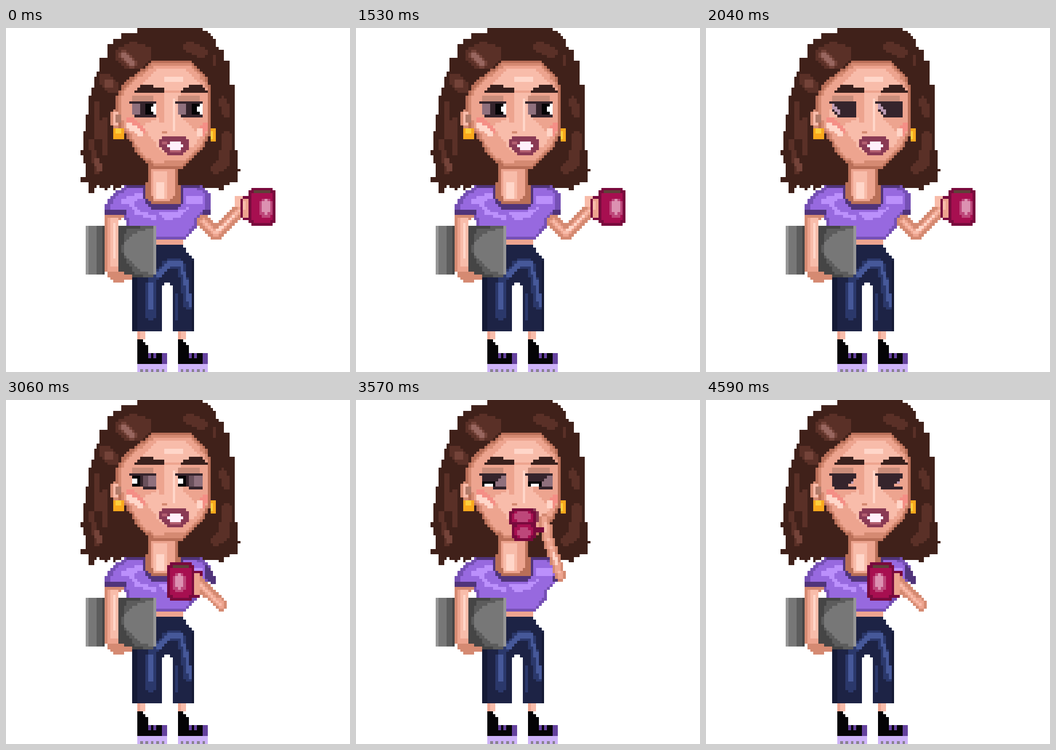
An HTML page with a canvas for the animation above (5100 ms loop, 600 by 600 pixels).

```html
<!DOCTYPE html>
<html>
<head>
<meta charset="utf-8">
<style>
html, body { margin: 0; width: 100%; height: 100%; overflow: hidden; background: #fff; }
canvas { display: block; width: 600px; height: 600px; }
</style>
</head>
<body>
<canvas id="stage" width="600" height="600"></canvas>
<script>
const ctx = document.getElementById('stage').getContext('2d');
const CELL = 600 / 127, STEP = 510;

const colors = {
  hair: '#40211a', hair2: '#5a3027', hair3: '#744339', hair4: '#98665f',
  edge: '#b96f58', shade: '#d58a72', skin: '#eda48f', light: '#f8bcaa', shine: '#ffd6c9', ear: '#b27b69',
  blush: '#f58f86', lid: '#c98d7b', brow: '#39201d', gold: '#f9a81c', sun: '#ffd03c',
  lip: '#8a3a54', lip2: '#b35f70', teeth: '#fff0fa',
  lash: '#35242c', mauve: '#8f707d', mauve2: '#69505b', lilac: '#bd9bb3', black: '#050406', white: '#fff',
  plum: '#50347a', violet: '#7650b5', purple: '#9769df', glow: '#bb90fb',
  slate: '#454545', slate2: '#5c5c5c', gray: '#777', silver: '#969696',
  navy: '#1d2345', ink: '#151a35', blue: '#2b386b', sky: '#465899',
  wine: '#790a3d', berry: '#a70f50', rose: '#bd477a', pink: '#dc91b1', coffee: '#5e4138',
  sole: '#cdb2f8', tread: '#89838f', lace: '#65429f'
};

const X = x => Math.round((x + .5) * CELL), Y = y => Math.round(y * CELL);
let shift = 0;

function box(color, x, y, w, h) {
  x += shift;
  ctx.fillStyle = colors[color];
  ctx.fillRect(X(x), Y(y), X(x + w) - X(x), Y(y + h) - Y(y));
}

// Box with its four corner cells missing.
function pill(color, x, y, w, h) {
  box(color, x + 1, y, w - 2, h);
  box(color, x, y + 1, w, h - 2);
}

// Fills a polygon cell by cell, so slanted edges become steps.
function poly(color, ...c) {
  const n = c.length, ys = c.filter((_, i) => i % 2);
  for (let y = Math.floor(Math.min(...ys)); y < Math.max(...ys); y++) {
    const cuts = [], m = y + .5;
    for (let i = 0; i < n; i += 2) {
      const [x0, y0, x1, y1] = [0, 1, 2, 3].map(k => c[(i + k) % n]);
      if (y0 > m !== y1 > m) cuts.push(Math.ceil(x0 + (m - y0) / (y1 - y0) * (x1 - x0) - .5));
    }
    cuts.sort((a, b) => a - b);
    for (let i = 0; i < cuts.length; i += 2) box(color, cuts[i], y, cuts[i + 1] - cuts[i], 1);
  }
}

// Repeats a polygon in new tones, each time smaller around a centre.
function nest(tones, cx, cy, step, ...c) {
  tones.split(' ').forEach((tone, k) => {
    poly(tone, ...c.map((v, i) => v + ((i % 2 ? cy : cx) - v) * step * k));
  });
}

function blob(color, cx, cy, rx, ry) {
  for (let y = Math.floor(cy - ry); y < cy + ry; y++) {
    const half = rx * Math.sqrt(Math.max(0, 1 - ((y + .5 - cy) / ry) ** 2));
    const left = Math.round(cx - half);
    box(color, left, y, Math.round(cx + half) - left, 1);
  }
}

// Thick rounded line from point to point; later tones are thinner.
function limb(tones, width, ...c) {
  tones.split(' ').forEach((tone, k) => {
    const r = width / 2 - k * .9;
    for (let i = 0; i + 3 < c.length; i += 2) {
      const [x, y, x1, y1] = c.slice(i, i + 4), dx = x1 - x, dy = y1 - y;
      for (let v = Math.floor(Math.min(y, y1) - r); v < Math.max(y, y1) + r; v++)
        for (let u = Math.floor(Math.min(x, x1) - r); u < Math.max(x, x1) + r; u++) {
          const px = u + .5 - x, py = v + .5 - y;
          const t = Math.min(1, Math.max(0, (px * dx + py * dy) / (dx * dx + dy * dy)));
          if (Math.hypot(px - t * dx, py - t * dy) <= r) box(tone, u, v, 1, 1);
        }
    }
  });
}

function fringe(x, depths) {
  [...depths].forEach((d, i) => box('hair', x + i, 50, 1, 7 + +d));
}

function drawHair() {
  poly('hair', 48, 0, 71, 0, 75, 2, 77, 4, 77, 7, 80, 8, 80, 12, 82, 12, 82, 21, 84, 21, 84, 45, 85, 45,
    85, 57, 72, 58, 48, 58, 29, 57, 29, 50, 28, 50, 28, 38, 29, 38, 30, 26, 32, 21, 33, 16, 34, 16,
    34, 11, 37, 11, 37, 6, 39, 6, 39, 4, 42, 4, 42, 2, 48, 2);
  fringe(29, '044212232132202200222');
  fringe(72, '22222233110');
  box('hair', 27, 45, 1, 2);
  box('hair', 27, 55, 2, 2);
  box('hair', 85, 52, 1, 1);

  poly('hair2', 40, 8, 46, 5, 53, 7, 53, 12, 49, 15, 44, 15, 40, 11);
  limb('hair3 hair4', 4, 43, 10, 46, 13);
  limb('hair2', 5, 36, 19, 39, 22);
  box('hair3', 36, 19, 3, 3);
  limb('hair2', 4, 67, 7, 72, 9);
  box('hair2', 76, 10, 1, 4);
  limb('hair2', 3, 79.5, 27, 81, 32);
  limb('hair2', 2.5, 33, 28, 33.5, 40);
  limb('hair2', 2, 36, 34, 36, 46);
  limb('hair2', 2, 31, 42, 33, 53);
  limb('hair3', 2, 33, 49, 34, 52);
  limb('hair2', 4, 81, 40, 80, 50, 77, 52);
}

function drawShirt() {
  nest('violet purple', 56, 70, .09, 44, 58, 71, 58, 75, 61, 75, 67, 70, 70, 70, 73, 67, 77, 65, 78,
    47, 78, 44, 73, 43, 69, 36, 69, 36, 66, 38, 62);
  limb('glow', 2, 43, 64, 49, 62);
  limb('glow', 1.5, 46, 65, 48, 68, 54, 70);
  poly('glow', 55, 68, 62, 68, 67, 66, 64, 70, 59, 71);
  blob('glow', 69, 63.5, 3, 2);
  box('plum', 36, 67, 8, 2);
  box('plum', 44, 58, 7, 1);
  box('plum', 64, 58, 7, 1);
  poly('plum', 50, 58, 65, 58, 65, 65, 62, 67, 53, 67, 50, 62);
  box('skin', 55, 78, 10, 2);
  poly('edge', 52, 50, 63, 50, 63, 57, 64, 58, 64, 65, 54, 65, 51, 62, 51, 58, 52, 57);
  poly('skin', 53, 52, 62, 52, 62, 61, 60, 64, 54, 64, 53, 60);
  box('light', 54, 53, 5, 10);
  box('shine', 55, 57, 3, 6);
}

function drawFace() {
  pill('shade', 38, 30, 6, 7);
  box('light', 39, 31, 3, 5);
  nest('edge shade skin', 60, 32, .045, 54, 12, 68, 12, 71, 15, 74, 19, 75, 22, 75, 39, 72, 45, 65, 52,
    55, 52, 49, 48, 44, 40, 41, 36, 40, 26, 42, 22, 46, 18);
  box('ear', 40, 32, 2, 3);
  poly('light', 56, 15, 66, 15, 72, 22, 60, 23, 49, 21);
  blob('shine', 61.5, 19, 4, 1);
  poly('light', 57, 24, 64, 24, 65, 34, 71, 39, 70, 43, 65, 46, 57, 46, 50, 36, 56, 33);
  box('gold', 39, 37, 4, 4);
  box('sun', 40, 37, 2, 2);
  box('gold', 75, 37, 2, 5);
  box('sun', 75, 38, 1, 3);
  limb('blush', 4, 45.5, 35, 49, 38);
  limb('shine', 2, 45, 36, 49.5, 39);
  limb('blush', 3, 73, 36, 71.5, 38.5);
  box('shine', 70, 37, 2, 3);
  box('skin', 56, 24, 2, 11);
  box('shine', 61, 26, 1, 12);
  box('shade', 57, 38, 2, 1);
  box('shade', 58, 49, 7, 1);

  poly('brow', 50, 21, 54, 21, 55, 22, 58, 22, 58, 24, 47, 24, 47, 23);
  poly('brow', 67, 21, 72, 21, 74, 23, 74, 24, 64, 24, 64, 23, 67, 22);
  poly('lip', 58, 40, 65, 40, 67, 41, 67, 44, 65, 47, 60, 47, 56, 44, 56, 42);
  box('lip2', 57, 42, 2, 1);
  box('lip2', 60, 45, 4, 1);
  pill('teeth', 59, 42, 6, 3);
}

function drawLegs() {
  poly('navy', 55, 80, 65, 80, 66, 82, 69, 85, 69, 112, 61, 112, 61, 96, 60, 94, 58, 94, 57, 96,
    57, 112, 46, 112, 46, 92, 55, 92);
  box('ink', 46, 92, 2, 20);
  box('ink', 68, 86, 1, 26);
  limb('blue', 3, 53, 107, 53, 94, 59, 87, 64, 87, 67, 103);
  limb('sky', 1.5, 53, 103, 53, 95);
  limb('sky', 1.5, 56, 91, 60, 87, 64, 87, 66, 94, 67.5, 102);
  box('blue', 62, 98, 1, 10);
  for (shift of [0, 15]) {
    box('skin', 48, 112, 3, 3);
    box('light', 49, 112, 2, 3);
    poly('black', 48, 115, 50, 115, 52, 117, 52, 120, 57, 120, 57, 124, 48, 124);
    box('lace', 52, 120, 1, 2);
    box('lace', 54, 120, 1, 2);
    box('lace', 57, 120, 2, 4);
    box('sole', 48, 124, 11, 3);
    for (let x = 49; x < 59; x += 2) box('tread', x, 126, 1, 1);
  }
  shift = 0;
}

function drawLaptop() {
  ['silver', 'gray', 'gray', 'gray', 'slate2', 'slate2', 'slate'].forEach((c, i) => box(c, 29 + i, 73, 1, 18));
  poly('slate', 41, 73, 54, 73, 54, 92, 46, 92, 41, 90);
  poly('slate2', 44, 74, 54, 73, 54, 92, 47, 91, 42, 82);
  poly('gray', 47, 76, 52, 74, 54, 74, 54, 91, 50, 90, 46, 87, 43, 83, 43, 79);
  box('silver', 54, 73, 1, 18);
  poly('shade', 36, 69, 44, 69, 41, 71, 41, 90, 46, 91, 46, 93, 40, 94, 37, 91, 36, 88);
  box('skin', 37, 70, 4, 20);
  box('light', 38, 70, 3, 18);
  box('shine', 39, 72, 1, 13);
}

function mug(x, y, glint) {
  pill('wine', x, y, 10, 14);
  pill('berry', x + 1, y + 1, 8, 12);
  box('coffee', x + 2, y + 1, 6, 1);
  pill('rose', x + glint, y + 4, 5, 7);
  pill('pink', x + glint + 1, y + 4, 3, 6);
}

const arms = {
  down() {
    box('plum', 72, 67, 3, 2);
    limb('shade skin light', 4.6, 72.5, 71.5, 77, 76, 86, 67);
    limb('shine', 1.2, 77, 75, 80, 73, 84, 69);
    box('light', 84, 62, 3, 4);
    pill('wine', 86, 62, 4, 9);
    box('skin', 87, 63, 2, 7);
    box('light', 87, 64, 1, 3);
    mug(89, 59, 4);
  },
  chest() {
    poly('plum', 73, 61, 75, 62, 77, 66, 77, 68, 75, 68, 73, 65);
    limb('shade skin light', 4.4, 70, 67, 79, 75.8);
    box('skin', 69, 64, 2, 8);
    box('wine', 69, 63, 3, 1);
    box('wine', 71, 64, 1, 1);
    box('wine', 69, 72, 2, 1);
    mug(59, 60, 2);
  },
  lips() {
    // The raised arm hides the outer part of the sleeve.
    poly('white', 70, 70, 75, 66, 77, 69, 72, 71);
    box('plum', 72, 65, 3, 2);
    limb('shade skin light', 4.2, 69, 44, 70, 50, 75, 65);
    limb('shine', 1.2, 72, 56, 74, 61);
    pill('wine', 56, 40, 10, 7);
    pill('berry', 57, 41, 8, 5);
    pill('rose', 58, 41, 6, 4);
    pill('wine', 57, 45, 9, 7);
    pill('berry', 58, 46, 7, 5);
    pill('rose', 59, 47, 5, 4);
    box('wine', 66, 47, 3, 2);
  }
};

const eyes = {
  right() {
    box('mauve', 46, 28, 4, 4);
    box('lash', 49, 28, 2, 4);
    box('black', 51, 28, 4, 4);
    box('white', 53, 29, 1, 2);
    box('white', 54, 28, 1, 4);
    box('lash', 47, 32, 8, 1);
  },
  shutRight() {
    box('lash', 46, 28, 9, 5);
    limb('lilac', 1.4, 46.5, 29, 48.5, 31.5);
    poly('light', 45, 30, 46, 30, 48, 33, 45, 33);
  },
  left() {
    box('mauve', 50, 28, 5, 4);
    box('mauve2', 50, 28, 2, 4);
    box('lash', 49, 28, 1, 4);
    box('black', 46, 28, 3, 4);
    box('white', 46, 29, 2, 2);
    box('lash', 50, 32, 5, 1);
  },
  low() {
    box('mauve', 50, 28, 5, 4);
    poly('lash', 46, 28, 54, 28, 51, 31, 51, 32, 46, 32);
    box('black', 46, 30, 5, 2);
    box('white', 47, 31, 3, 1);
    box('lash', 50, 32, 5, 1);
  },
  shutLeft() {
    poly('lash', 46, 28, 55, 28, 52, 32, 46, 32);
    box('lilac', 53, 30, 1, 1);
    box('lash', 47, 32, 8, 1);
  }
};

// Each entry lasts one step: gaze and arm.
const beats = [
  ['right', 'down'], ['right', 'down'], ['shutRight', 'down'], ['right', 'down'],
  ['shutRight', 'down'], ['left', 'down'], ['left', 'chest'], ['low', 'lips'],
  ['left', 'chest'], ['shutLeft', 'chest']
];

function paint([gaze, arm]) {
  ctx.fillStyle = '#fff';
  ctx.fillRect(0, 0, 600, 600);
  drawHair();
  drawShirt();
  drawFace();
  drawLegs();
  drawLaptop();
  for (shift of [0, 17]) {
    box('lid', 46, 25, 8, 2);
    box('lash', 45, 27, 10, 1);
    eyes[gaze]();
  }
  shift = 0;
  arms[arm]();
}

let shown = -1;
const start = performance.now();
function tick() {
  const beat = Math.floor((performance.now() - start) / STEP) % beats.length;
  if (beat !== shown) paint(beats[shown = beat]);
  requestAnimationFrame(tick);
}
tick();
</script>
</body>
</html>
```
